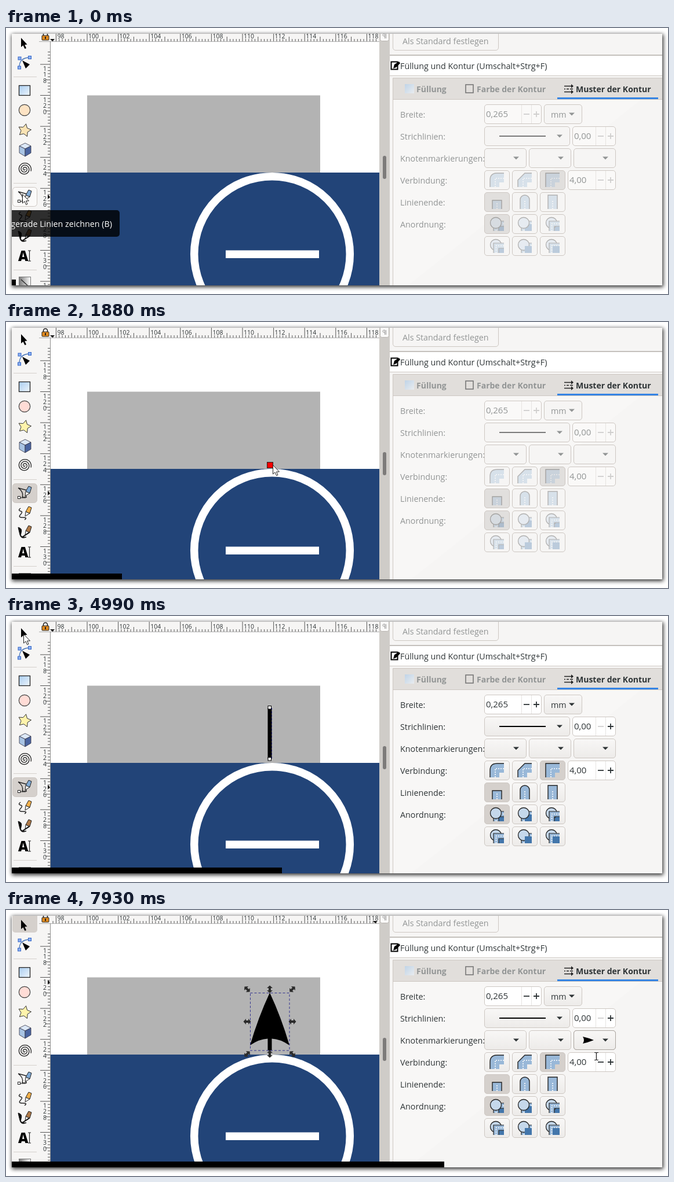
Animation, 1142 px wide and 460 px high, one loop 8 s. Source, as an HTML page:

```html
<!DOCTYPE html>
<html lang="de">
<head>
<meta charset="utf-8">
<title>Muster der Kontur</title>
<style>
  html, body { margin: 0; width: 100%; height: 100%; overflow: hidden; background: #fff; }
  svg { display: block; width: 100%; height: 100%; }
  text { font-family: "Open Sans", "Noto Sans", sans-serif; white-space: pre; }
</style>
</head>
<body>
<svg id="stage" viewBox="0 0 1142 460" xmlns="http://www.w3.org/2000/svg"></svg>
<script>
const LOOP = 8000;
const BG = '#f6f5f4', EDGE = '#cdc7c2', DARK = '#2e3436', DIM = '#929595', PRESSED = '#d5d0cc';
const UNIT = 26.8;

const rect = (x, y, w, h, fill, more = '') =>
  `<rect x="${x}" y="${y}" width="${w}" height="${h}" fill="${fill}" ${more}/>`;
const path = (d, fill = 'none', stroke = 'none', width = 1, more = '') =>
  `<path d="${d}" fill="${fill}" stroke="${stroke}" stroke-width="${width}" ${more}/>`;
const text = (x, y, s, fill = DARK, size = 14.3, more = '') =>
  `<text x="${x}" y="${y}" fill="${fill}" font-size="${size}" ${more}>${s}</text>`;
const group = (id, body, more = '') => `<g id="${id}" ${more}>${body}</g>`;
const at = (x, y, body) => `<g transform="translate(${x} ${y})">${body}</g>`;
const circle = (x, y, r, fill, stroke, width = 1, more = '') =>
  `<circle cx="${x}" cy="${y}" r="${r}" fill="${fill}" stroke="${stroke}" stroke-width="${width}" ${more}/>`;
const box = (x, y, w, h, fill, more = '') =>
  rect(x + .5, y + .5, w - 1, h - 1, fill, `rx="4.5" stroke="${EDGE}" ${more}`);
const range = (n, f) => Array.from({ length: n }, (_, i) => f(i)).join('');

function rulers() {
  let ticks = '', labels = '';
  for (let i = -14; i < 100; i++) {
    const p = i * UNIT / 5, big = i % 10 === 0, len = big ? 17 : i % 5 === 0 ? 8 : 4;
    const x = 140 + p, y = 120.5 + p;
    if (x > 77 && x < 643) ticks += `M${x},27v${-len}`;
    if (y > 27) ticks += `M76,${y}h${-len}`;
    if (!big) continue;
    const n = 100 + i / 5;
    if (x < 640) labels += text(x + 2, 22, n, DARK, 10.5);
    [...String(n + 20)].forEach((d, k) => {
      labels += text(67, y + 11 + k * 10.5, d, DARK, 10.5, 'text-anchor="middle"');
    });
  }
  return rect(57, 0, 587, 27, BG) + rect(57, 0, 19.5, 470, BG) +
    path(ticks, 'none', '#555') + labels + path('M57,27.5H644M76.5,27V470', 'none', '#8d8d8d', .7) +
    rect(57, 0, 19, 26, BG) + rect(62, 17, 12, 8, '#e08a1e', 'rx="1" stroke="#222"') +
    path('M64.5,17v-2a3.5,3.5 0 0 1 7,0v2', 'none', '#222', 1.6) + rect(67, 19, 2, 4, '#222') +
    group('markX', path('M-4,23h8l-4,4z', '#111')) + group('markY', path('M72,-4v8l4,-4z', '#111'));
}

function star() {
  const pts = Array.from({ length: 10 }, (_, i) => {
    const a = -1.35 + i * Math.PI / 5, r = i % 2 ? 6 : 11.5;
    return `${32 + r * Math.cos(a)},${181 + r * Math.sin(a)}`;
  });
  return `<polygon id="star" points="${pts.join(' ')}" stroke="#333" stroke-linejoin="round"/>`;
}

function spiral() {
  const pts = Array.from({ length: 80 }, (_, i) => {
    const a = i / 79 * 6.1 * Math.PI, r = .6 + i / 79 * 11;
    return `${32 + r * Math.cos(a)},${248 + r * Math.sin(a)}`;
  });
  return path('M' + pts.join('L'), 'none', '#222', 1.3);
}

function toolbar() {
  const nib = (y, color) =>
    path(`M34,${y - 1}l5,-9 5,2 -3,10z`, color, '#222') +
    path(`M34,${y - 1}l7,3 -8,5z`, '#eee', '#222');
  return rect(0, 0, 57, 470, BG) +
    rect(11, 10, 43, 33, PRESSED, 'id="selectOn" rx="5"') +
    rect(11.5, 279.5, 42, 33, PRESSED, `id="penButton" rx="5" stroke="${EDGE}"`) +
    path('M13,88.5H53M13,272.5H53M13,422.5H53', 'none', '#d5d0cc') +
    path('M26,21V37L29.5,34 32.5,40 35,39 32.3,33 36.5,32.5Z', '#000') +
    path('M23,73Q22,56 40,55', 'none', '#4a76b8', 1.3) +
    [[20.5, 70], [21, 54], [38.5, 52.5]].map(p => rect(p[0], p[1], 5, 5, '#8bb0f0', 'stroke="#3465c8"')).join('') +
    path('M28,60L41,67 34,74Z', '#000') +
    rect(22.5, 103.5, 19, 17, 'url(#sky)', 'stroke="#222" stroke-width="1.3"') +
    circle(32, 146, 9.7, '#ffdcd6', '#444', 1.2, 'id="ellipse"') + star() +
    path('M23,208L33,203 43,208 33,213Z', '#dce8f6', '#334', .8) +
    path('M23,208L33,213V226L23,220Z', '#a9c4e4', '#334', .8) +
    path('M33,213L43,208V220L33,226Z', '#4a64a0', '#334', .8) + spiral() +
    path('M21,287Q31,294 28,303H35Q33,296 36,291L21,287', 'none', '#222', 1.4) +
    rect(20.5, 301.5, 4, 4, '#fff', 'stroke="#222"') + path('M25,304H34', 'none', '#222') +
    nib(294, '#7fa9d4') +
    path('M25,322q-5,4 0,5t0,6 4,5 3,4', 'none', '#222', 1.4) + nib(329, '#f3b04a') +
    path('M21,355q8,2 5,10t9,7q-9,4 -11,-4t-3,-13', '#111', '#111') + nib(362, '#b07a48') +
    path('M28,372L40,364', 'none', '#111', 2) +
    text(21, 406.5, 'A', '#000', 24, 'font-weight="800"') +
    path('M38,389h5M38,407h5M40.5,389V407', 'none', '#222', 1.2) +
    rect(22.5, 434.5, 20, 16, 'url(#steel)', 'stroke="#777"') + path('M26,439L38,450', 'none', '#222', 1.2);
}

const drawing = () => rect(77, 27, 567, 440, '#fff') +
  rect(140, 120.5, 402, 134, '#b3b3b3') + rect(77, 254, 567, 210, '#224478') +
  circle(459, 395, 134.3, 'none', '#fff', 13.5) + rect(379, 388.5, 161, 13.5, '#fff');

function handles(xs, ys) {
  const turn = [45, 90, -45, 0, 0, 0, -45, 90, 45];
  return turn.map((a, i) => i === 4 ? '' :
    path('M-6.5,0L-2,-5V-2H2V-5L6.5,0 2,5V2H-2V5Z', '#2b2b2b', 'none', 1,
      `transform="translate(${xs[i % 3]} ${ys[i / 3 | 0]}) rotate(${a})"`)).join('');
}

function strokes() {
  const line = path('M455,159V247', 'none', '#000', 7) +
    path('M458.5,159V247', 'none', '#25257a', 1, 'stroke-dasharray="3 3"');
  const end = y => rect(452, y - 2.5, 5.5, 5.5, '#fff', 'stroke="#000"');
  return group('start', rect(450.5, 242.5, 10, 10, '#f00', 'stroke="#222"')) +
    group('line', line) + group('ends', end(158) + end(247)) +
    group('small', handles([445.5, 455, 464.5], [152, 203, 253])) +
    group('arrow',
      path('M455,147Q475,190 489,238Q473,227 458.5,226.5V247H451.5V226.5Q437,227 421,238Q435,190 455,147Z', '#000') +
      path('M421.5,147.5H489V247H421.5Z', 'none', '#35358f', 1, 'stroke-dasharray="4 3"') +
      handles([416, 455, 494], [141, 197, 253]));
}

const caret = (x, y, fill) => path(`M${x - 5},${y - 2.5}h10l-5,5z`, fill);

function panel(on) {
  const ink = on ? DARK : DIM, white = on ? '#fff' : '#faf9f8', face = on ? 'url(#face)' : BG;
  const held = on ? PRESSED : '#e1dfdd', sign = '#d0cfce';
  const button = (x, cy, w, fill = face) => box(x, cy - 17, w, 34, fill);
  const drop = (x, cy, w) => button(x, cy, w) + caret(x + w - 18, cy, ink);
  const spin = (x, cy, w, value, minus = on) => {
    const r = x + w;
    return box(x, cy - 17, w, 34, white) + path(`M${r - 34.5},${cy - 16}v32M${r - 17.5},${cy - 16}v32`, 'none', '#e6e3e1') +
      text(x + 3, cy + 5, value, ink, 15) +
      path(`M${r - 31},${cy}h10`, 'none', minus ? DARK : sign, 1.8) +
      path(`M${r - 14},${cy}h10m-5,-5v10`, 'none', on ? DARK : sign, 1.8);
  };
  const icon = (x, cy, body) => at(x + 10, cy - 12, `<g opacity="${on ? 1 : .32}">${body}</g>`);
  const dots = d => path(d, 'none', '#fff', 1.6, 'stroke-dasharray="2 2"');
  const buttons = (cy, held0, icons) => icons.map((body, i) =>
    button(825 + i * 48, cy, 44, i === held0 ? held : face) + icon(825 + i * 48, cy, body)).join('');

  const joins = ['M0,24V12Q0,0 12,0H24', 'M0,24V12L12,0H24', 'M0,24V0H24'].map(d =>
    path(d + 'V16H16V24Z', '#99b8d8') + path(d, 'none', '#222', 1.4) + dots('M9,24V9H24'));
  const caps = ['M4,24V9H20V24', 'M4,24V8a8,8 0 0 1 16,0V24', 'M4,24V0H20V24'].map((d, i) =>
    path(d, '#99b8d8', '#222', 1.4) + dots(i ? 'M12,24V8' : 'M12,24V14'));
  const part = {
    F: rect(12, 12, 12, 12, '#4376ab'),
    M: circle(10, 10, 9.5, '#c5d8eb', '#222', 1.3),
    S: path('M6,24V7H24V16H15V24Z', '#99b8d8') + path('M6,24V7H24M15,24V16H24', 'none', '#222', 1.2) + dots('M10.5,24V11.5H24')
  };
  const orders = ['FSM', 'SFM', 'FMS', 'MFS', 'SMF', 'MSF'].map(o => [...o].map(k => part[k]).join(''));
  const rows = ['Breite', 'Strichlinien', 'Knotenmarkierungen', 'Verbindung', 'Linienende', 'Anordnung'];

  return rows.map((s, i) => text(680, 159 + i * 38, s + ':', ink)).join('') +
    spin(825, 153, 99, '0,265') + drop(928, 153, 66) + text(940, 158.5, 'mm', ink) +
    drop(825, 191, 148) + path('M851,191H931', 'none', on ? '#000' : '#7a7a7a', 2) + spin(977, 191, 75, '0,00', false) +
    drop(825, 229, 73) + drop(902, 229, 73) + drop(979, 229, 73) +
    buttons(267, 2, joins) + spin(969, 267, 83, '4,00') +
    buttons(305, 0, caps) + buttons(343, 0, orders.slice(0, 3)) + buttons(381, -1, orders.slice(3));
}

function panelFrame() {
  const bold = 'font-weight="700"';
  return rect(644, 0, 18.5, 470, '#cfccc8') + rect(650, 225, 6, 40, '#7d7b7a', 'rx="3"') +
    rect(645.5, 5.5, 15, 21, '#faf9f8', 'rx="3" stroke="#b8b4b0"') +
    path('M655.5,22v-8M653.5,22v-8h-1.5a2,2 0 0 0 0,4h1.5', 'none', '#999') +
    rect(662, 0, 480, 470, BG) + box(667, 2, 183, 41, BG) +
    text(684, 32, 'Als Standard festlegen', DIM) +
    rect(662, 50, 480, 2, '#c4c0bc') + rect(662, 52, 480, 34, '#fff') + rect(662, 86, 480, 1, EDGE) +
    rect(664.5, 62.5, 11, 13, '#fff', 'stroke="#000" stroke-width="2"') + path('M668,74l2,-7 8,-5 2,3 -7,7z', '#000') +
    text(680, 75, 'Füllung und Kontur (Umschalt+Strg+F)') +
    path('M667.5,470V90.5H1142', '#f8f7f6', EDGE) + rect(668, 91, 474, 36, '#e1dedb') + rect(668, 127, 474, 1, EDGE) +
    rect(951, 124, 174, 3, '#3584e4') +
    rect(688, 101, 16, 16, 'url(#sky)', 'opacity=".6"') + text(708, 115, 'Füllung', DIM, 14, bold) +
    rect(793, 102, 13, 14, 'none', 'stroke="#777" stroke-width="1.6"') + text(812, 115, 'Farbe der Kontur', DIM, 14, bold) +
    path('M963,104.5H977M963,109.5h2m2,0h4m2,0h5M963,114.5H977', 'none', '#222', 1.6) +
    path('M975,101l4,3.5 -4,3.5zM975,111l4,3.5 -4,3.5z', '#222') +
    text(983, 115, 'Muster der Kontur', DARK, 14, bold);
}

const head = (x, y) => path(`M${x},${y - 6}Q${x + 9},${y - 4} ${x + 19},${y}Q${x + 9},${y + 4} ${x},${y + 6}Q${x + 4},${y} ${x},${y - 6}Z`, '#000');

const popup = () => rect(978.5, 5, 74, 450, '#fff', `stroke="${EDGE}"`) +
  rect(979, 216, 73, 23, '#3584e4', 'id="pick"') + range(5, i => head(1002, 255 + i * 32)) +
  range(2, i => circle(1015, 415 + i * 32, 3, '#000', 'none') + path(`M1005,${415 + i * 32}h8`, 'none', '#777'));

document.getElementById('stage').innerHTML = `
  <defs>
    <linearGradient id="sky" x2="1" y2="1"><stop stop-color="#a9cdf0"/><stop offset="1" stop-color="#eef5fc"/></linearGradient>
    <linearGradient id="steel"><stop stop-color="#777"/><stop offset="1" stop-color="#fff"/></linearGradient>
    <linearGradient id="face" x2="0" y2="1"><stop stop-color="#f8f7f6"/><stop offset="1" stop-color="#edebe9"/></linearGradient>
    <filter id="blur" x="-5%" y="-10%" width="110%" height="120%"><feGaussianBlur stdDeviation="3.6"/></filter>
    <clipPath id="window"><rect x="10" y="10" width="1122" height="435"/></clipPath>
  </defs>
  ${rect(0, 0, 1142, 460, '#fff')}${rect(10, 11, 1124, 437, '#000', 'opacity=".8" filter="url(#blur)"')}
  <g clip-path="url(#window)">
    ${group('view', drawing() + strokes() + rulers() + toolbar() + panelFrame() +
      group('off', panel(false)) + group('on', panel(true)) +
      group('marker', rect(979.5, 212.5, 72, 33, 'none', 'rx="4.5" stroke="#aaa49e"') + head(995, 229)) +
      group('tip', rect(-10, 319, 206, 46, '#000', 'rx="5" opacity=".81"') +
        text(183, 348, 'gerade Linien zeichnen (B)', '#fff', 14.3, 'text-anchor="end"')))}
    ${group('popup', popup())}
    ${rect(10, 435, 0, 11, '#000', 'id="bar"')}
    ${group('pointer', path('M.5,.5V16L4,12.8 6.6,18.6 9,17.5 6.5,12H11.5Z', '#fff', '#222'))}
    ${group('beam', path('M1015,246.5h2.5l1,1 1,-1h2.5M1018.5,247v12M1015,259.5h2.5l1,-1 1,1h2.5', 'none', '#222', 1.2))}
  </g>`;

const el = id => document.getElementById(id);
const show = (id, yes) => el(id).style.display = yes ? '' : 'none';
const move = (id, x, y) => el(id).setAttribute('transform', `translate(${x} ${y})`);

const samples = [0];
[[70, 960, 7], [1150, 2060, 6], [2260, 3170, 6], [3340, 4280, 6], [4460, 5330, 6],
 [5530, 6480, 6], [6650, 7580, 6], [7760, 7930, 2]].forEach(([a, b, n]) => {
  for (let i = 0; i < n; i++) samples.push(Math.round((a + (b - a) * i / (n - 1)) / 10) * 10);
});

const barKeys = [[0, 17], [1150, 135], [2790, 281], [4990, 477], [6100, 581], [7200, 686], [7930, 756]];
const pointerKeys = [
  [0, 28, 287], [430, 32, 290], [1150, 413, 231], [1700, 462, 250], [2060, 457, 244], [2790, 457, 172],
  [3170, 455, 160], [3520, 455, 159], [4280, 111, 75], [4640, 32, 35], [4990, 30, 31], [5330, 30, 19],
  [5530, 120, 45], [6100, 893, 196], [6480, 1015, 222], [6830, 1024, 228], [7200, 1026, 229],
  [7580, 1019, 252], [7930, 1018, 253]
];

function tween(keys, t) {
  const i = keys.findIndex(k => k[0] > t);
  if (i < 0) return keys[keys.length - 1].slice(1);
  const a = keys[i - 1], b = keys[i], f = (t - a[0]) / (b[0] - a[0]);
  return a.slice(1).map((v, k) => v + (b[k + 1] - v) * f);
}

function render(t) {
  const selected = t >= 5140, early = t < 360, drawn = t >= 3340, done = t >= 7750;
  const [x, y] = tween(pointerKeys, t);
  move('view', 0, early || selected ? -4 : 0);
  move('markX', selected ? 637 : 80, 0);
  move('markY', 0, selected ? 129 : 296);
  move('pointer', Math.round(x), Math.round(y));
  el('bar').setAttribute('width', Math.round(tween(barKeys, t)[0]) - 10);
  el('ellipse').setAttribute('fill', early ? '#fde3c4' : '#ffdcd6');
  el('star').setAttribute('fill', early ? '#fae3b4' : '#fff3ab');
  el('penButton').setAttribute('fill', early ? '#fbfaf9' : PRESSED);
  el('pick').setAttribute('y', y < 241 ? 216 : 240);
  show('selectOn', selected);
  show('penButton', !selected);
  show('tip', t < 1500);
  show('start', t >= 1690 && !drawn);
  show('line', drawn && !done);
  show('ends', drawn && !selected);
  show('small', selected && !done);
  show('arrow', done);
  show('off', !drawn);
  show('on', drawn);
  show('marker', done);
  show('popup', t >= 6820 && !done);
  show('pointer', !done);
  show('beam', done);
}

const origin = performance.now();
let last = -1;
function tick() {
  const now = (performance.now() - origin) % LOOP;
  const t = samples.filter(s => s <= now).pop();
  if (t !== last) render(last = t);
  requestAnimationFrame(tick);
}
tick();
</script>
</body>
</html>
```
